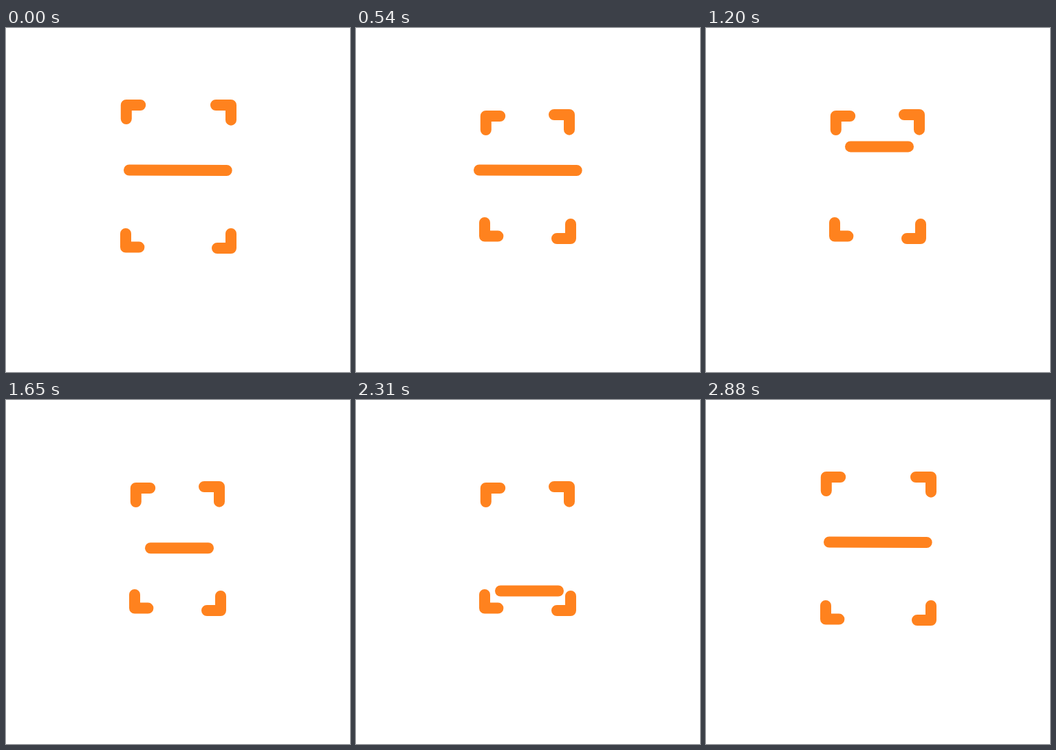
Write an HTML page that moves like this. It is 500 px wide and 500 px high and loops after 2.97 s.

```html
<!DOCTYPE html>
<html lang="en">
<head>
<meta charset="utf-8">
<title>Scan frame</title>
<style>
  html, body { margin: 0; width: 100%; height: 100%; overflow: hidden; background: #fff; }
  svg { display: block; width: 100%; height: 100%; }
  path { fill: none; stroke: #ff821e; stroke-width: 16; stroke-linecap: round; stroke-linejoin: round; }
</style>
</head>
<body>
<svg viewBox="0 0 500 500">
  <g id="corners"></g>
  <path id="bar"/>
</svg>
<script>
const LOOP = 2970;
const SLOT = 30;          // display refresh of the animation
const STEP = LOOP / 72;   // length of one motion step
const LAG = 17;

// Elbow position, arm lengths, and shift when the frame closes in
const corners = [
  { x: 174.8, y: 112, armX: 20.4, armY: 20, dx: 14, dy: 16 },
  { x: 327, y: 112, armX: -22, armY: 21.7, dx: -17, dy: 14 },
  { x: 174, y: 318.6, armX: 19.4, armY: -19.6, dx: 13, dy: -16 },
  { x: 327, y: 320, armX: -20, armY: -21, dx: -15, dy: -14 }
];

// Bar ends: left x, left y, right x, right y
const WIDE = [179, 206.5, 320.7, 207];
const TOP = [210, 153, 294, 153];
const BOTTOM = [210, 277.5, 294, 277.5];

const group = document.getElementById("corners");
const bar = document.getElementById("bar");

for (const c of corners) {
  c.el = document.createElementNS("http://www.w3.org/2000/svg", "path");
  c.el.setAttribute("d", `M${c.x + c.armX} ${c.y}H${c.x}V${c.y + c.armY}`);
  group.append(c.el);
}

const ramp = (n, from, to) => Math.min(1, Math.max(0, (n - from) / (to - from)));
const mix = (a, b, p) => a.map((v, i) => v + (b[i] - v) * p);

function barAt(n) {
  if (n < 23) return mix(WIDE, TOP, ramp(n, 13, 19));
  if (n < 60) return mix(TOP, BOTTOM, ramp(n, 23, 55));
  return mix(BOTTOM, WIDE, ramp(n, 60, 69));
}

function draw(ms) {
  const shown = Math.floor((ms % LOOP) / SLOT) * SLOT;
  const n = Math.max(0, Math.floor((shown - LAG) / STEP));
  const closed = ramp(n, 0, 12) - ramp(n, 60, 69);
  for (const c of corners) {
    c.el.setAttribute("transform", `translate(${c.dx * closed} ${c.dy * closed})`);
  }
  const [x1, y1, x2, y2] = barAt(n);
  bar.setAttribute("d", `M${x1} ${y1}L${x2} ${y2}`);
}

const start = performance.now();
function tick() {
  draw(performance.now() - start);
  requestAnimationFrame(tick);
}
tick();
</script>
</body>
</html>
```
